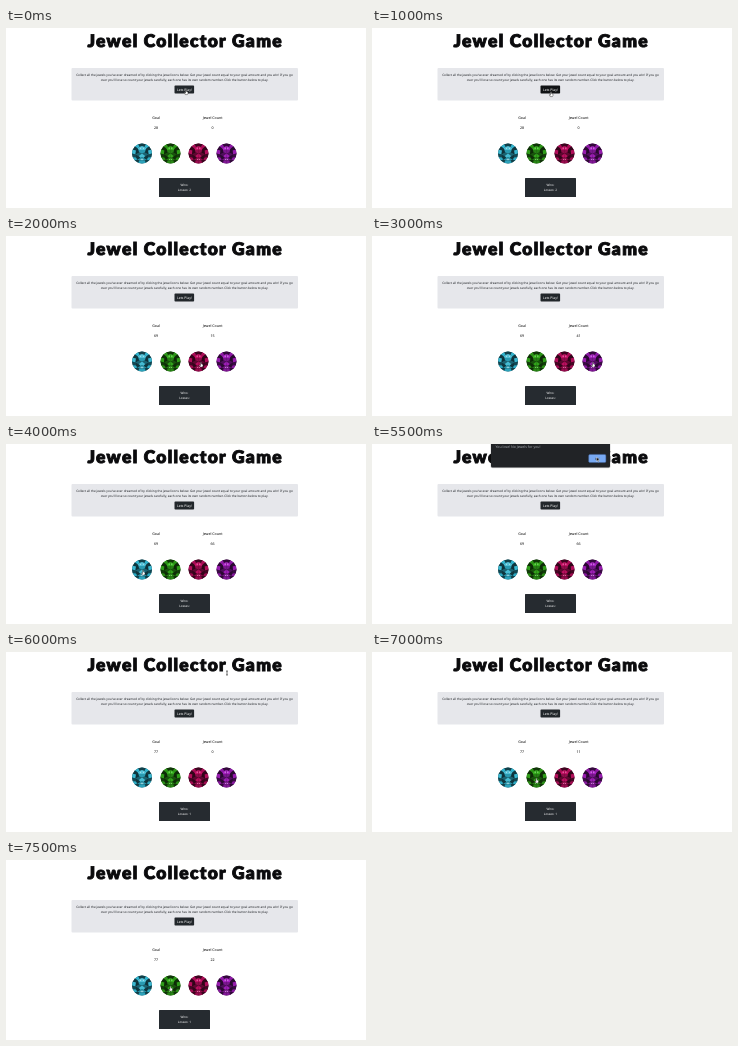
An HTML page for the animation above (8 s loop, 360 by 180 pixels).

```html
<!DOCTYPE html>
<html lang="en">
<head>
<meta charset="utf-8">
<title>Jewel Collector Game</title>
<style>
  html, body { margin: 0; width: 100%; height: 100%; overflow: hidden; background: #fff; }
  svg { display: block; width: 360px; height: 180px; }
  text { font-family: "Noto Sans", "Open Sans", sans-serif; text-anchor: middle; fill: #212529; text-rendering: geometricPrecision; }
  .title { font: 900 17.4px Lato, sans-serif; letter-spacing: 1.3px; fill: #0b0b0d; stroke: #0b0b0d; stroke-width: .9px; }
  .intro { font-size: 3.11px; fill: #1c1f23; }
  .label { font-size: 3.6px; fill: #000; }
  .light { fill: #fff; }
</style>
</head>
<body>
<svg viewBox="0 0 360 180" xmlns="http://www.w3.org/2000/svg">
  <text class="title" x="179.2" y="18.6">Jewel Collector Game</text>

  <rect x="65.5" y="40" width="226.5" height="32.5" rx="1" fill="#e6e7eb"/>
  <text class="intro" x="178.5" y="47.7">Collect all the jewels you've ever dreamed of by clicking the jewel icons below. Get your jewel count equal to your goal amount and you win! If you go</text>
  <text class="intro" x="178.5" y="52.8">over you'll lose so count your jewels carefully, each one has its own random number. Click the button below to play.</text>
  <rect id="play" x="168.5" y="57.6" width="19.6" height="8" rx=".8"/>
  <text class="light" x="178.4" y="62.8" font-size="3.4">Lets Play!</text>

  <text class="label" x="150" y="91">Goal</text>
  <text class="label" x="206.6" y="91">Jewel Count</text>
  <text class="label" id="goal" x="150" y="101.2"></text>
  <text class="label" id="count" x="206.6" y="101.2"></text>

  <g id="jewels"></g>

  <rect x="153" y="150" width="51" height="19" rx=".6" fill="#262b30"/>
  <text class="light" x="178.4" y="158" font-size="3.1">Wins:</text>
  <text class="light" id="losses" x="178.4" y="163.3" font-size="3.1"></text>

  <g id="dialog">
    <rect x="118.4" y="-3" width="120.2" height="27.2" rx="2" fill="#000" opacity=".15"/>
    <rect x="119" y="-3" width="119" height="26.4" rx="1.5" fill="#212326"/>
    <text x="123.5" y="4.2" font-size="3.5" style="text-anchor:start;fill:#a4a8ad">You lose! No Jewels for you!</text>
    <rect x="216.7" y="10.4" width="17.2" height="8.2" rx="1.4" fill="#78a9f2" stroke="#43659c" stroke-width=".5"/>
    <text x="225.2" y="15.7" font-size="3.1">OK</text>
  </g>

  <g id="cursor" stroke="#111" stroke-width=".4" stroke-linejoin="round" fill="#fff">
    <path id="hand" d="M-.5 0Q0-.6.5 0V1.5L2 1.9V3.4L1.4 4.6H-.7L-1.8 2.9L-1.4 2.4L-.5 3.1Z"/>
    <path id="arrow" d="M0 0V4.3L1 3.4L1.7 5L2.4 4.7L1.7 3.2H3.1Z" fill="#111" stroke="#fff"/>
    <path id="beam" d="M-.9 0H.9M0 0V4M-.9 4H.9" stroke-width=".6"/>
  </g>
</svg>
<script>
  const $ = id => document.getElementById(id);
  const STEP = 500;

  // goal, count, losses, cursor x, cursor y, cursor shape
  const steps = [
    [28, 0, 2, 180, 62, "hand"],
    [28, 0, 2, 179.5, 63, "hand"],
    [28, 0, 2, 179, 64, "hand"],
    [69, 0, "", 164.5, 126, "hand"],
    [69, 15, "", 195, 126.5, "hand"],
    [69, 26, "", 194, 126.5, "hand"],
    [69, 41, "", 221, 126.5, "hand"],
    [69, 55, "", 193, 126.5, "hand"],
    [69, 66, "", 137, 126.5, "hand"],
    [69, 66, "", 137, 126.5, "hand"],
    [69, 66, "", 214, 46, "arrow"],
    [69, 66, "", 224.5, 13, "arrow"],
    [77, 0, 1, 221, 19, "beam"],
    [77, 0, 1, 165, 126.5, "hand"],
    [77, 11, 1, 164.5, 126.5, "hand"],
    [77, 22, 1, 164.5, 126.5, "hand"]
  ];

  // Right half of the cut stone; the left half mirrors it.
  const facets = [
    ["M0-10L3.8-9.2L2.5-6.5L0-7.5Z", .35],
    ["M3.8-9.2L7.1-7L4.5-5.2L2.5-6.5Z", 1],
    ["M7.1-7L9.2-3.8L6-3L4.5-5.2Z", .3],
    ["M9.2-3.8L10 0L6.5 1L6-3Z", 1.05],
    ["M10 0L9.2 3.8L6 4L6.5 1Z", .4],
    ["M9.2 3.8L7.1 7L4.5 6L6 4Z", .95],
    ["M7.1 7L3.8 9.2L2.5 7L4.5 6Z", .35],
    ["M3.8 9.2L0 10V7.5L2.5 7Z", .9],
    ["M0-7.5L2.5-6.5L4.5-5.2L3.5-3.5H0Z", 1.15],
    ["M4.5-5.2L6-3L6.5 1L2.8-1L3.5-3.5Z", .28],
    ["M0-3.5H3.5L2.8-1L0 0Z", .85],
    ["M0 0L2.8-1L6.5 1L3.5 2.8Z", .55],
    ["M0 0L3.5 2.8L1.5 4.5L0 3.5Z", 1.1],
    ["M3.5 2.8L6.5 1L6 4L4.5 6L1.5 4.5Z", .3],
    ["M0 3.5L1.5 4.5L4.5 6L2.5 7L0 7.5Z", .8],
    ["M.6-6L2-5.4L1.3-4.2Z", 2.2],
    ["M.2 5L1.7 6L.4 6.8Z", 2]
  ];

  function jewel(x, hue, sat, light) {
    const color = l => `hsl(${hue} ${sat}% ${Math.min(86, l * light)}%)`;
    const half = facets.map(([d, l]) => `<path d="${d}" fill="${color(l)}"/>`).join("");
    return `<g transform="translate(${x} 125.5)"><circle r="10" fill="${color(.5)}"/>
      ${half}<g transform="scale(-1 1)">${half}</g></g>`;
  }

  $("jewels").innerHTML =
    jewel(136, 190, 62, 50) + jewel(164.5, 110, 72, 34) +
    jewel(192.5, 332, 85, 36) + jewel(220.5, 290, 72, 38);

  function draw() {
    const i = Math.floor(performance.now() / STEP) % steps.length;
    const [goal, count, losses, x, y, shape] = steps[i];
    $("goal").textContent = goal;
    $("count").textContent = count;
    $("losses").textContent = `Losses: ${losses}`;
    $("play").setAttribute("fill", i === 2 ? "#101214" : "#22272b");
    $("dialog").style.display = i >= 9 && i <= 11 ? "" : "none";
    $("cursor").setAttribute("transform", `translate(${x} ${y})`);
    for (const id of ["hand", "arrow", "beam"]) $(id).style.display = id === shape ? "" : "none";
    requestAnimationFrame(draw);
  }
  draw();
</script>
</body>
</html>
```
